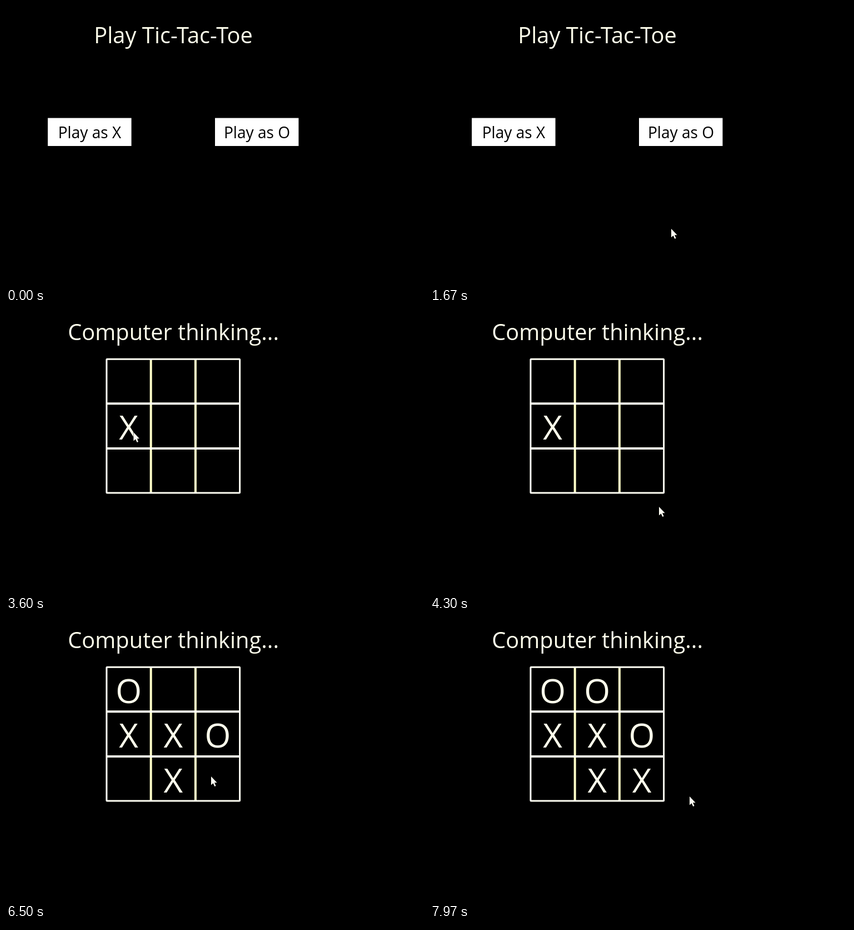
Write an HTML page that moves like this. It is 752x504 px and loops after 8000 ms.

```html
<!DOCTYPE html>
<html lang="en">
<head>
<meta charset="utf-8">
<title>Tic-Tac-Toe</title>
<style>
  html, body { margin: 0; width: 100%; height: 100%; overflow: hidden; background: #000; }
  svg { display: block; width: 752px; height: 504px; }
  text { font-family: "Open Sans", "Noto Sans", sans-serif; text-anchor: middle; fill: #ffffec; }
  .title { font-size: 39.7px; }
  .label { font-size: 28px; fill: #000; }
  .mark { font-size: 60px; }
  .button { fill: #fff; }
  .line { fill: none; stroke: #fffff4; }
  .upright { stroke: #ffffc8; }
  #cursor { fill: #fffff4; stroke: #000; stroke-width: 1; paint-order: stroke; }
</style>
</head>
<body>
<svg viewBox="0 0 752 504">
  <g transform="scale(1.00267 1.008)">
    <g id="menu">
      <text class="title" x="300.3" y="66.3">Play Tic-Tac-Toe</text>
      <rect class="button" x="75" y="200" width="150" height="50"/>
      <text class="label" x="150" y="236.3">Play as X</text>
      <rect class="button" x="375" y="200" width="150" height="50"/>
      <text class="label" x="450.3" y="236.3">Play as O</text>
    </g>
    <g id="game">
      <text class="title" id="status" x="300.3" y="46.3"></text>
      <path class="line upright" stroke-width="4" d="M260 80V320M340 80V320"/>
      <path class="line" stroke-width="4" d="M180 160H420M180 240H420"/>
      <rect class="line" stroke-width="3" x="180.5" y="80.5" width="239" height="239" rx="1"/>
      <g id="marks"></g>
    </g>
  </g>
  <path id="cursor" d="M0 0V15.5L3.6 12.2L6.3 18L8.6 17L6 11.2H10.6Z"/>
</svg>
<script>
const LOOP = 8000;
const TILE = 80;

const $ = id => document.getElementById(id);
const show = (el, on) => el.setAttribute('visibility', on ? 'visible' : 'hidden');
const ease = u => u * u * (3 - 2 * u);
const column = cell => cell % 3;
const row = cell => Math.floor(cell / 3);

// The pointer glides between stops; the board cells count from the top left.
const stops = [];
const marks = [];
const glide = (at, x, y) => stops.push({ at, x, y });
const hover = (at, cell) => glide(at, 209 + column(cell) * TILE, 118 + row(cell) * TILE);

function mark(at, symbol, cell) {
  const el = document.createElementNS('http://www.w3.org/2000/svg', 'text');
  el.setAttribute('class', 'mark');
  el.setAttribute('x', 220 + column(cell) * TILE);
  el.setAttribute('y', 144.4 + row(cell) * TILE);
  el.textContent = symbol;
  marks.push({ at, el: $('marks').appendChild(el) });
}

function click(at, cell) {
  hover(at, cell);
  mark(at, 'X', cell);
}

const reply = (at, cell) => mark(at, 'O', cell);

glide(330, 16, 500);
glide(830, 618, 470);
glide(1670, 434, 401);
glide(1900, 532, 390);
glide(2300, 150, 232);
const boardAt = 2350;
glide(2830, 213, 255);
click(3430, 3);
glide(4300, 412, 347);
reply(4480, 5);
glide(4520, 548, 430);
click(4830, 7);
glide(5070, 393, 351);
reply(5380, 0);
click(5690, 4);
hover(5800, 8);
reply(6560, 1);
click(7560, 8);
glide(7970, 467, 314);

function pointerAt(t) {
  const i = stops.findIndex(stop => stop.at > t);
  const to = stops[i < 0 ? stops.length - 1 : i];
  if (i < 0) return [to.x, to.y];
  const from = stops[i - 1];
  const u = ease((t - from.at) / (to.at - from.at));
  return [from.x + (to.x - from.x) * u, from.y + (to.y - from.y) * u];
}

function draw(t) {
  const playing = t >= boardAt;
  show($('menu'), !playing);
  show($('game'), playing);

  const played = marks.filter(m => t >= m.at).length;
  marks.forEach((m, i) => show(m.el, i < played));
  $('status').textContent = played % 2 ? 'Computer thinking...' : 'Play as X';

  const inside = t >= stops[0].at;
  show($('cursor'), inside);
  if (inside) $('cursor').setAttribute('transform', `translate(${pointerAt(t)})`);
}

const start = performance.now();
function tick() {
  draw((performance.now() - start) % LOOP);
  requestAnimationFrame(tick);
}
tick();
</script>
</body>
</html>
```
